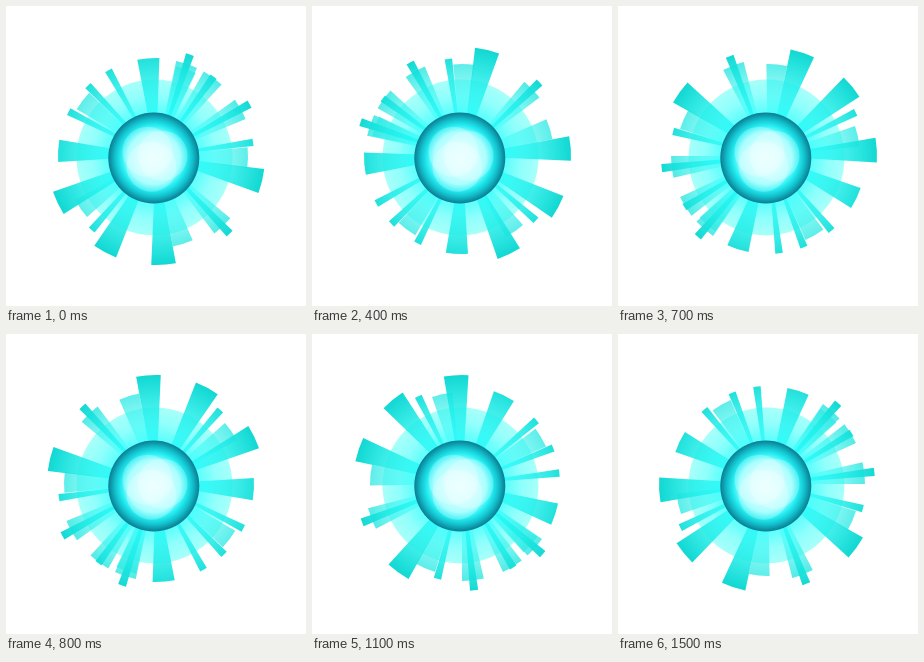
These frames come from a looping animation (300x300 px, 1600 ms). An HTML page with a canvas:

```html
<!DOCTYPE html>
<html lang="en">
<head>
<meta charset="utf-8">
<title>Glowing orb</title>
<style>
  html, body { margin: 0; width: 100%; height: 100%; overflow: hidden; background: #fff; }
  canvas { display: block; }
</style>
</head>
<body>
<canvas id="stage" width="300" height="300"></canvas>
<script>
const ctx = document.getElementById("stage").getContext("2d");
const STEP = 100, STEPS = 16, TAU = Math.PI * 2, DEG = TAU / 360;
const ORB = 45.5, WIDE = 13, THIN = 4.4;

function radial(inner, outer, ...colors) {
  const gradient = ctx.createRadialGradient(0, 0, inner, 0, 0, outer);
  colors.forEach((color, i) => gradient.addColorStop(i / (colors.length - 1), color));
  return gradient;
}

function disc(x, y, r, fill) {
  ctx.fillStyle = fill;
  ctx.beginPath();
  ctx.arc(x, y, r, 0, TAU);
  ctx.fill();
}

function rays(angles, spread, length, fill) {
  ctx.fillStyle = fill;
  for (const angle of angles) {
    ctx.beginPath();
    ctx.moveTo(0, 0);
    ctx.arc(0, 0, length, (angle - spread / 2) * DEG, (angle + spread / 2) * DEG);
    ctx.fill();
  }
}

function at(x, y, paint) {
  ctx.save();
  ctx.translate(x, y);
  paint();
  ctx.restore();
}

const glow = radial(ORB, 78, "#5cfffc", "#90fffc", "#a8fff9");
const paleFill = radial(ORB, 98, "rgba(40,252,250,.3)", "rgba(50,230,224,.85)");
const rayFill = radial(ORB, 110, "rgba(20,248,246,.6)", "rgba(30,236,231,.85)", "rgb(16,214,209)");
const orbFill = radial(0, ORB, "#d4ffff", "#ccffff", "#c0ffff", "#acfeff", "#92feff",
                       "#26eff3", "#12bfcb", "#0a7c92");

const longThin = [46.5, 288.5, 331];
const fiveSpokes = Array.from({ length: 5 }, (_, i) => i * 72 + 1);

function drawRays(turn) {
  ctx.rotate(turn);
  rays(fiveSpokes, WIDE, 92, paleFill);
  rays([...longThin, 306], WIDE, 97, paleFill);
  rays(longThin, THIN, 107, rayFill);
  rays([131, 207, 226, 241, 306, 352], THIN, 98, rayFill);
  rays([13.4, 86, 118, 154.4], WIDE, 109, rayFill);
  rays([183, 265.5], WIDE, 98, rayFill);
}

function drawOrb() {
  disc(0, 0, ORB, orbFill);
  for (let angle = 105; angle < 465; angle += 120)
    disc(9 * Math.cos(angle * DEG), 9 * Math.sin(angle * DEG), 25, "rgba(255,255,255,.24)");
}

function draw(now) {
  const turn = -Math.floor(now / STEP) % STEPS / STEPS * TAU;
  ctx.clearRect(0, 0, 300, 300);
  at(148.5, 151.5, () => disc(0, 0, 78, glow));
  at(150, 150, () => drawRays(turn));
  at(147.8, 152, drawOrb);
  requestAnimationFrame(draw);
}
draw(0);
</script>
</body>
</html>
```
